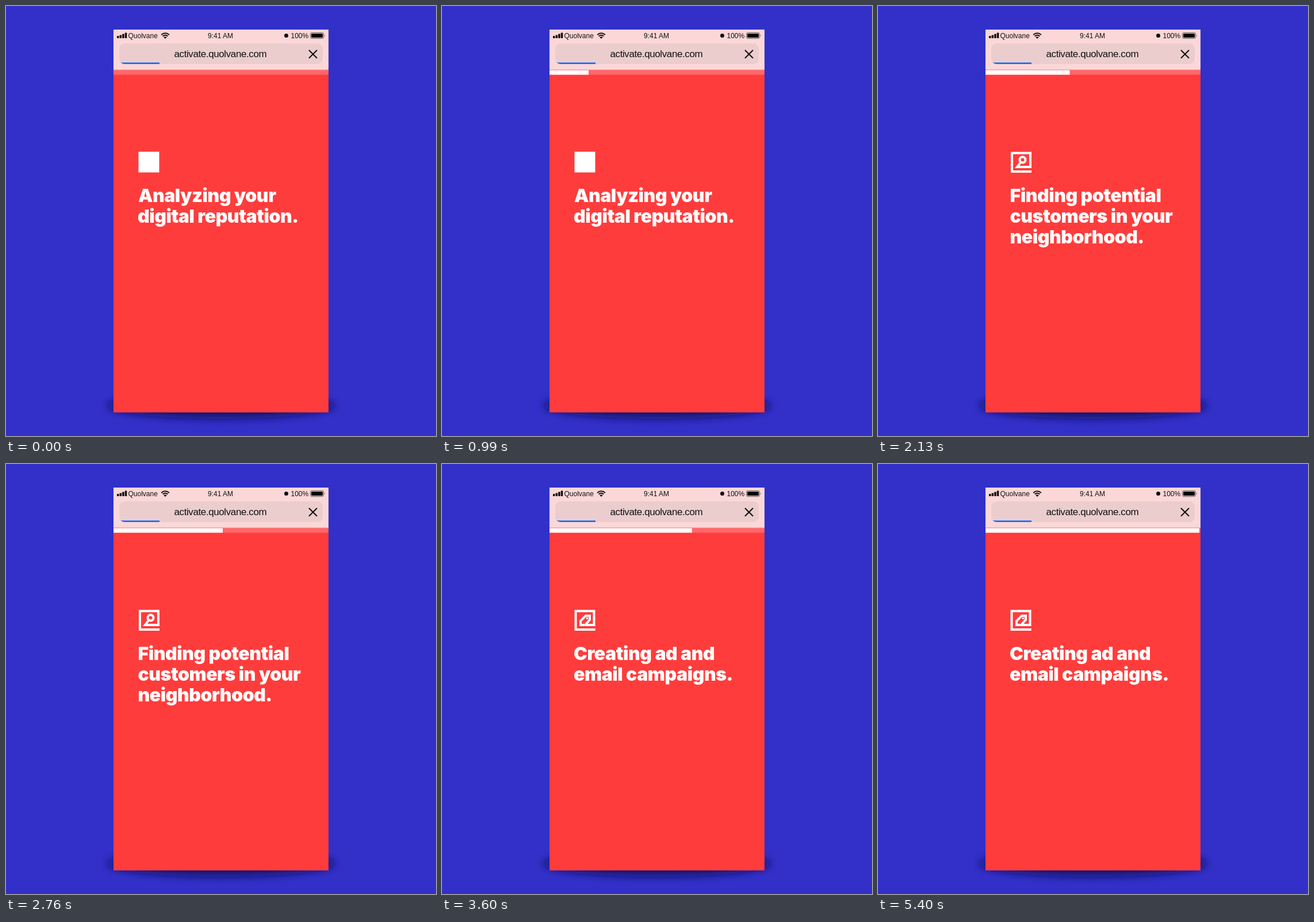
These frames come from a looping animation (748x748 px, 5430 ms). An HTML page:

```html
<!DOCTYPE html>
<html lang="en">
<head>
<meta charset="utf-8">
<title>Loading steps</title>
<style>
  :root { --loop: 5430ms; }
  html, body { margin: 0; width: 100%; height: 100%; overflow: hidden; background: #3230c8; }
  svg { display: block; width: 100%; height: 100%; }

  .status { font: 12px "Liberation Sans", Arial, sans-serif; fill: #111; }
  .address { font: 17px "Liberation Sans", Arial, sans-serif; letter-spacing: -.4px; fill: #111; }
  .headline {
    font: 900 32px Inter, "Open Sans", sans-serif;
    font-optical-sizing: none;
    letter-spacing: -.48px;
    fill: #fff;
  }
  .icon { fill: none; stroke: #fff; stroke-width: 4; }

  /* The bar advances in 30 ms ticks */
  .progress { transform-origin: 187px 0; animation: fill var(--loop) steps(181) infinite; }
  .step { animation: var(--loop) step-end infinite; }
  .analyze { animation-name: first; }
  .find { animation-name: second; }
  .create { animation-name: third; }

  @keyframes fill { from { transform: scaleX(0); } to { transform: scaleX(1); } }
  @keyframes first {
    0% { visibility: visible; }
    33.14%, 100% { visibility: hidden; }
  }
  @keyframes second {
    0% { visibility: hidden; }
    33.14% { visibility: visible; }
    66.29%, 100% { visibility: hidden; }
  }
  @keyframes third {
    0% { visibility: hidden; }
    66.29%, 100% { visibility: visible; }
  }
</style>
</head>
<body>
<svg viewBox="0 0 748 748">
  <defs>
    <filter id="soft" x="-20%" y="-100%" width="140%" height="300%">
      <feGaussianBlur stdDeviation="7"/>
    </filter>
    <clipPath id="field"><rect x="197" y="65" width="354" height="36" rx="9"/></clipPath>
    <clipPath id="fan"><path d="M277 57 L267 47 V43 H287 V47 Z"/></clipPath>
  </defs>

  <rect width="748" height="748" fill="#3230c8"/>
  <ellipse cx="374" cy="695" rx="198" ry="23" fill="#0c0a50" opacity=".75" filter="url(#soft)"/>

  <!-- Phone screen -->
  <rect x="187" y="41" width="374" height="666" fill="#ff3c3c"/>
  <rect x="187" y="41" width="374" height="70" fill="#fbd7d8"/>

  <!-- Status bar -->
  <g fill="#111">
    <rect x="193" y="52" width="3.5" height="4" rx=".8"/>
    <rect x="197.6" y="50.4" width="3.5" height="5.6" rx=".8"/>
    <rect x="202.2" y="48.4" width="3.5" height="7.6" rx=".8"/>
    <rect x="206.8" y="46.4" width="3.5" height="9.6" rx=".8"/>
  </g>
  <g clip-path="url(#fan)" fill="none" stroke="#111" stroke-width="2">
    <circle cx="277" cy="56.5" r="9.3"/>
    <circle cx="277" cy="56.5" r="5.8"/>
    <circle cx="277" cy="56.5" r="1.7" stroke-width="3.2"/>
  </g>
  <circle cx="487.5" cy="51.5" r="3.5" fill="#111"/>
  <rect x="529.5" y="46.5" width="23" height="10" rx="2.6" fill="none" stroke="#555" stroke-width="1"/>
  <rect x="531" y="48" width="20" height="7" rx="1.3" fill="#000"/>
  <path d="M553.8 49.6 q1.8 1.9 0 3.8 z" fill="#555"/>
  <g class="status">
    <text x="212.5" y="56">Quolvane</text>
    <text x="351" y="56">9:41 AM</text>
    <text x="495.5" y="56">100%</text>
  </g>

  <!-- Address field -->
  <g clip-path="url(#field)">
    <rect x="197" y="65" width="354" height="36" fill="#ebcdce"/>
    <rect x="197" y="98.3" width="70" height="2.7" fill="#146ff5"/>
  </g>
  <text class="address" x="292.5" y="89.2">activate.quolvane.com</text>
  <path d="M527 76.8 l14 14 m0 -14 l-14 14" stroke="#111" stroke-width="2.1"/>

  <!-- Progress -->
  <rect x="187" y="111" width="374" height="8.5" fill="#ff6769"/>
  <rect class="progress" x="187" y="111.5" width="374" height="8" fill="#fff"/>
  <rect x="187" y="110.5" width="374" height="1" fill="#f59a9b"/>

  <g class="step analyze">
    <rect x="230.5" y="253.5" width="36" height="36" fill="#fff"/>
    <g class="headline">
      <text x="230" y="341">Analyzing your</text>
      <text x="229" y="377">digital reputation.</text>
    </g>
  </g>

  <g class="step find">
    <g class="icon">
      <path d="M267 288 H233 V255.7 H265 V280 H242 L248 272"/>
      <circle cx="251.5" cy="267.5" r="5"/>
    </g>
    <g class="headline">
      <text x="229.5" y="341">Finding potential</text>
      <text x="229.5" y="377">customers in your</text>
      <text x="229.5" y="413">neighborhood.</text>
    </g>
  </g>

  <g class="step create">
    <g class="icon">
      <path d="M266.7 288 H232.5 V255.7 H264.5 V280 H249 L257 271 V264 H250 L241 273 V280 H247"/>
      <circle cx="252.5" cy="268.5" r="1.7" fill="#fff" stroke="none"/>
    </g>
    <g class="headline">
      <text x="229" y="341">Creating ad and</text>
      <text x="229" y="377">email campaigns.</text>
    </g>
  </g>
</svg>
</body>
</html>
```
